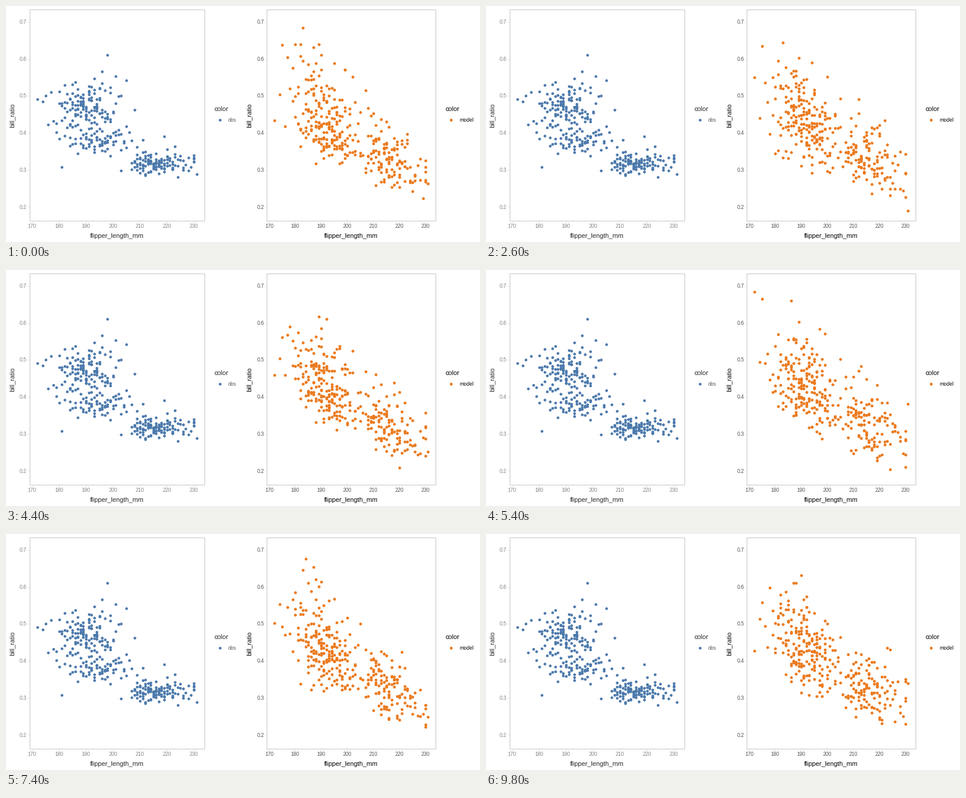
A matplotlib script for the animation above (10000 ms loop, 800x400 px).

```python
import numpy as np
import matplotlib.pyplot as plt
from matplotlib.animation import FuncAnimation
from matplotlib.patches import Rectangle

W, H, DPI = 800, 400, 100
FRAMES, STEP_MS = 50, 200
PX = 72 / DPI
BLUE, ORANGE, LINE = "#4a78ab", "#eb7a1e", "#cacaca"

plt.rcParams["font.family"] = "Liberation Sans"
plt.rcParams["text.hinting"] = "no_autohint"

# Penguins that stand apart from their group: flipper length, bill ratio
LONERS = [(172, .491), (174, .485), (176, .423), (181, .307), (198, .610),
          (203, .298), (208, .463), (219, .390), (223, .363), (231, .289)]


def normal_scores(n, rng):
    """Evenly spread standard normal values, in rising order."""
    return np.sort(rng.normal(size=(300, n)), axis=1).mean(axis=0)


def group(n, flipper, ratio, sd, rng):
    z = normal_scores(n, rng)
    length = np.round(np.minimum(flipper(z), 230))
    return length, ratio + sd * rng.permutation(z)


def penguins():
    rng = np.random.RandomState(12)
    parts = [
        np.transpose(LONERS),
        group(139, lambda z: 190.1 + 5.9 * z, 0.470, 0.037, rng),
        group(67, lambda z: 195.6 + 6.6 * z, 0.378, 0.017, rng),
        group(117, lambda z: 216 + 6.2 * z + z ** 2, 0.318, 0.0145, rng),
    ]
    return np.hstack(parts)


FLIPPER, RATIO = penguins()


def simulated(i):
    rng = np.random.RandomState(300 + i)
    z = np.clip(rng.normal(size=FLIPPER.size), -2.9, 2.6)
    return 0.437 * np.exp(-0.0113 * (FLIPPER - 190) + 0.142 * z)


def y_px(ratio):
    return 27 + (0.7 - ratio) * 627


fig = plt.figure(figsize=(W / DPI, H / DPI), dpi=DPI, facecolor="white")
ax = fig.add_axes([0, 0, 1, 1])
ax.set(xlim=(0, W), ylim=(H, 0))
ax.axis("off")


def label(x, y, text, size, color, **kw):
    ax.text(x, y, text, fontsize=size * PX, color=color, **kw)


def dots(x, y, color, size):
    return ax.scatter(x, y, s=(size * PX) ** 2, c=color, linewidths=0)


class Panel:
    def __init__(self, left, right, color, size, name, legend_x, title, tick, key):
        self.left = left
        self.scale = (right - left) / 1.1 / 59
        ax.add_patch(Rectangle((left, 6), right - left, 358, fill=False,
                               ec=LINE, lw=1.1 * PX))
        for x in range(170, 231, 10):
            px = self.x_px(x)
            ax.plot([px, px], [364, 366.7], color=LINE, lw=0.6 * PX)
            label(px, 376.2, x, 8.8, tick, ha="center")
        for r in np.arange(2, 8) / 10:
            y = y_px(r)
            ax.plot([left - 2.7, left], [y, y], color=LINE, lw=0.6 * PX)
            label(left - 4.7, y + 3.1, f"{r:.1f}", 8.8, tick, ha="right")
        mid = (left + right) / 2
        label(mid, 392.7, "flipper_length_mm", 11, title, ha="center")
        label(left - 24.4, 185, "bill_ratio", 11, title, rotation=90,
              ha="right", va="center")
        label(legend_x, 178, "color", 11, title)
        label(legend_x + 23, 196.2, name, 8.8, key)
        dots([legend_x + 9], [193], color, size)
        self.cloud = dots([], [], color, size)

    def x_px(self, x):
        return self.left + (x - 172 + 2.95) * self.scale

    def show(self, ratio):
        self.cloud.set_offsets(np.column_stack([self.x_px(FLIPPER), y_px(ratio)]))


obs = Panel(39.7, 335, BLUE, 4.6, "obs", 351.7, "#262626", "#808080", "#555555")
model = Panel(440, 725.3, ORANGE, 4.8, "model", 742, "black", "#4d4d4d", "black")
obs.show(RATIO)


def update(i):
    model.show(simulated(i))
    return [model.cloud]


anim = FuncAnimation(fig, update, frames=FRAMES, interval=STEP_MS,
                     repeat=True, repeat_delay=0)
plt.show()
```
